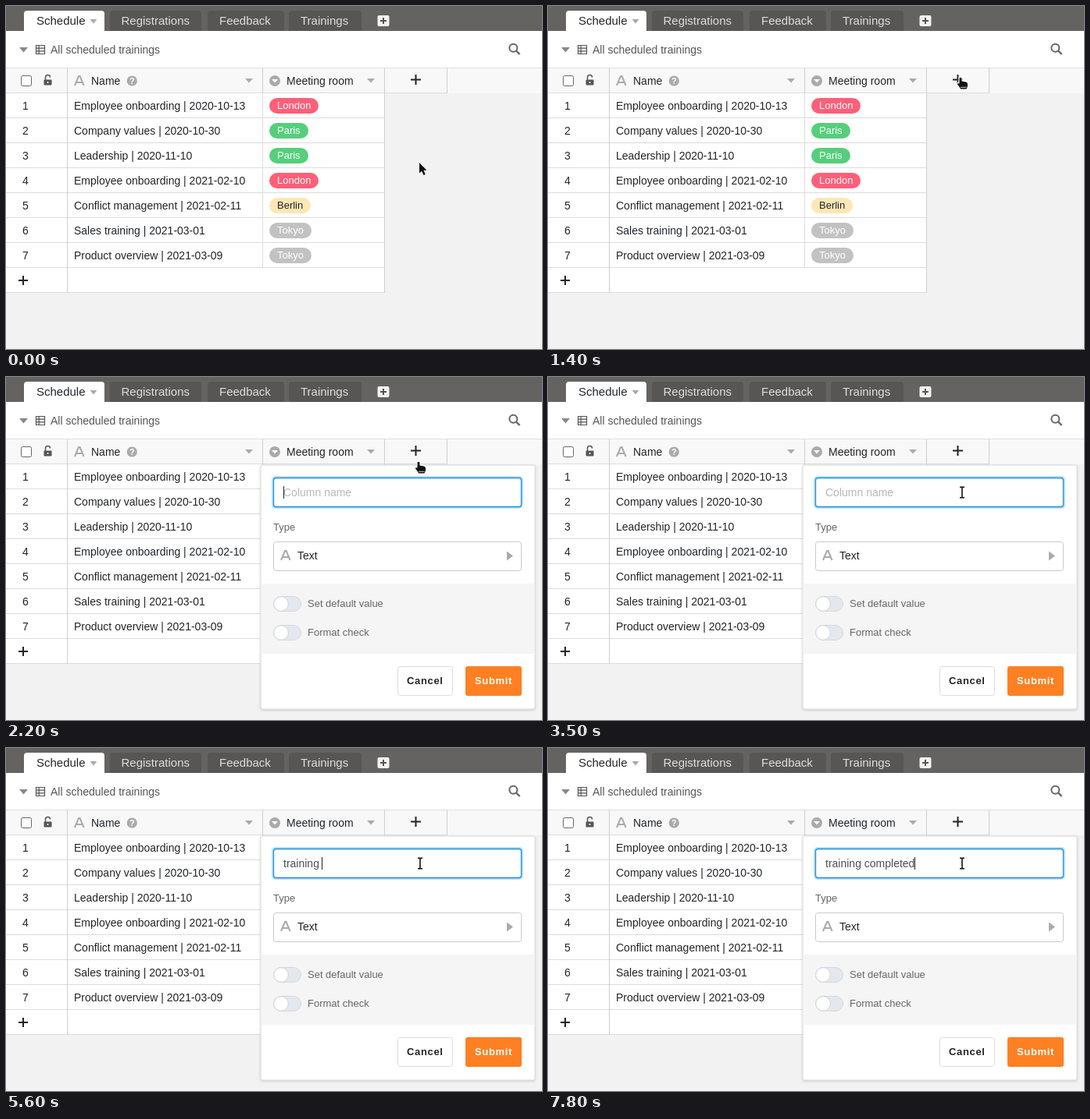
Animation, 686 px wide and 440 px high, one loop 8 s. Source, as an HTML page:

```html
<!DOCTYPE html>
<html lang="en">
<head>
<meta charset="utf-8">
<title>Adding a column</title>
<style>
  html, body { margin: 0; width: 100%; height: 100%; overflow: hidden; background: #f2f2f2; }
  svg { display: block; }
  text { font: 14px "Liberation Sans", Arial, sans-serif; white-space: pre; }
  .tab { font-size: 15px; }
  .small { font-size: 13px; }
  .button { font-size: 13px; font-weight: bold; letter-spacing: .65px; }
  .cursor path { stroke-linejoin: round; paint-order: stroke; }
</style>
</head>
<body>
<svg id="stage" width="686" height="440" viewBox="0 0 686 440"></svg>
<script>
const rect = (x, y, w, h, fill, r = 0, extra = '') =>
  `<rect x="${x}" y="${y}" width="${w}" height="${h}" rx="${r}" fill="${fill}" ${extra}/>`;
const box = (x, y, w, h, fill, stroke, r) =>
  rect(x + .5, y + .5, w - 1, h - 1, fill, r, `stroke="${stroke}"`);
const path = (d, fill, extra = '') => `<path d="${d}" fill="${fill}" ${extra}/>`;
const line = (d, stroke, width = 1) => path(d, 'none', `stroke="${stroke}" stroke-width="${width}"`);
const circle = (x, y, r, fill, extra = '') => `<circle cx="${x}" cy="${y}" r="${r}" fill="${fill}" ${extra}/>`;
const text = (x, y, s, fill = '#212529', cls = '', extra = '') =>
  `<text x="${x}" y="${y}" fill="${fill}" class="${cls}" ${extra}>${s}</text>`;
const down = (x, y, w, h, fill) => path(`M${x} ${y}h${w}l${-w / 2} ${h}z`, fill);
const plus = (x, y, r, color, width = 2) => line(`M${x - r} ${y}h${2 * r}M${x} ${y - r}v${2 * r}`, color, width);
const letterA = (x, y) => line(`M${x} ${y}l5 -12h1.6l5 12M${x + 2.2} ${y - 4}h7.2`, '#aaa', 2);

const rows = [
  ['Employee onboarding | 2020-10-13', 'London'],
  ['Company values | 2020-10-30', 'Paris'],
  ['Leadership | 2020-11-10', 'Paris'],
  ['Employee onboarding | 2021-02-10', 'London'],
  ['Conflict management | 2021-02-11', 'Berlin'],
  ['Sales training | 2021-03-01', 'Tokyo'],
  ['Product overview | 2021-03-09', 'Tokyo']
];
const rooms = { // pill width, fill, text colour
  London: [63, '#ff5f79', '#fff'],
  Paris: [50, '#55cf7b', '#fff'],
  Berlin: [53, '#ffe6b5', '#212529'],
  Tokyo: [54, '#c2c2c2', '#fff']
};

function topBars() {
  const tab = (x, w, label, tx, fill, color) =>
    path(`M${x} 32V10q0 -4 4 -4h${w - 8}q4 0 4 4V32z`, fill) + text(tx, 24, label, color, 'tab');
  return rect(0, 0, 686, 32, '#646362') +
    tab(23, 103, 'Schedule', 39, '#fff', '#212529') + down(107.5, 17, 9, 5.5, '#aaa') +
    tab(133, 117, 'Registrations', 147.5, '#575655', '#dedede') +
    tab(258, 98, 'Feedback', 273, '#575655', '#dedede') +
    tab(362, 93, 'Trainings', 377, '#575655', '#dedede') +
    rect(475.5, 12, 15, 14, '#f2f2f2', 2) + plus(483, 19, 4, '#555') +
    rect(0, 32, 686, 48, '#fff') +
    down(17, 53, 11, 6.5, '#888') +
    line('M38.5 50.5h11v11h-11zM38.5 54.2h11M38.5 57.8h11M42.2 50.5v11', '#555', 1.2) +
    text(57, 61, 'All scheduled trainings', '#555') +
    circle(649.3, 53.7, 5, 'none', 'stroke="#666" stroke-width="2"') + line('M653 57.5l4.5 4.5', '#666', 2.4);
}

function table() {
  const header = rect(0, 80, 686, 32, '#f8f8f8') + rect(485, 112, 201, 328, '#f2f2f2') +
    line('M0 79.5H686', '#dfdfdf') +
    box(19, 89, 14, 14, '#fff', '#666', 2) +
    rect(48.5, 94.5, 10, 7, '#555', 1) + line('M50.5 95V91.5a3 3 0 0 1 6 0', '#555', 1.5) +
    circle(53.5, 98, 1.1, '#f8f8f8') +
    letterA(88, 102) + text(109, 101, 'Name') +
    circle(161.3, 96, 6.6, '#aaa') +
    text(161.3, 99.8, '?', '#fff', '', 'text-anchor="middle" style="font-size:11px;font-weight:bold"') +
    down(306, 93, 10, 5.5, '#aaa') +
    circle(344, 96, 7, '#aaa') + down(340, 94, 8, 4.5, '#fff') +
    text(359, 101, 'Meeting room') + down(462, 93, 10, 5.5, '#aaa') +
    plus(524.5, 94.5, 6.5, '#212529');
  const body = rows.map(([name, room], i) => {
    const y = 112 + 32 * i, [w, fill, color] = rooms[room];
    return text(25, y + 21, i + 1, '#212529', '', 'text-anchor="middle"') + text(87, y + 21, name) +
      rect(337, y + 6, w, 20, fill, 10) + text(347, y + 20, room, color, 'small');
  }).join('');
  let rules = 'M0 111.5H565M328.5 112V335';
  for (let y = 143.5; y < 370; y += 32) rules += `M0 ${y}H485`;
  return header + rect(0, 112, 485, 256, '#fff') + body + plus(22, 352, 6, '#212529') +
    line(rules, '#dcdcdc') + line('M78.5 80V368M328.5 80V112M484.5 80V368M564.5 80V112', '#cfcfcf');
}

function panel() {
  const toggle = (y, label) => box(342, y, 36, 20, '#e4e8ee', '#d5d9df', 9.5) +
    circle(352, y + 10, 9.3, '#fff', 'stroke="#d0d4da"') + text(386, y + 14, label, '#666', 'small');
  return `<g id="panel">` +
    rect(326, 113, 351, 313, '#fff', 2, 'stroke="#d8d8d8" filter="url(#shadow)"') +
    rect(326.5, 265, 350, 90, '#f5f5f5') +
    `<g id="focus">${rect(341, 128, 320, 40, 'none', 4, 'stroke="#bfe0f7" stroke-width="2"')}</g>` +
    rect(342.5, 129.5, 317, 37, '#fff', 3, 'stroke="#1991de" stroke-width="1.3"') +
    text(355, 153, '', '', '', 'id="entry"') +
    rect(355, 140, 1, 16, '#222', 0, 'id="caret"') +
    text(342, 197, 'Type', '#666', 'small') +
    box(342, 211, 318, 38, '#fff', '#c9c9c9', 3) + letterA(352, 235) +
    text(373, 234, 'Text') + path('M641 223.5l8 6 -8 6z', '#aaa') +
    toggle(281, 'Set default value') + toggle(318, 'Format check') +
    box(501, 371, 71, 38, '#fff', '#dcdcdc', 3) + text(513, 394, 'Cancel', '#212529', 'button') +
    rect(588, 371, 72, 38, '#ff8023', 3) + text(600, 394, 'Submit', '#fff', 'button') + '</g>';
}

// Each pointer is drawn around its hot spot.
const pointers = {
  arrow: path('M0 0V13.5L3 10.8 5.5 16 7.8 15 5.5 9.8H9.5Z', '#111', 'stroke="#fff" stroke-width="1.6"'),
  hand: path('M-1.5 1.5Q0 0 1.5 1.5V5.5L7 6.5Q9 7 9 9V12L7.5 15.5H0L-1 13.5 -4 9.5Q-4 7 -1.5 8.5Z', '#111',
    'stroke="#fff" stroke-width="2.4"') + line('M0 13.3H7.5', '#fff', .8),
  beam: path('M-3 -7.5H3V-6H.8V6H3V7.5H-3V6H-.8V-6H-3Z', '#111', 'stroke="#fff" stroke-width="1.4"')
};

document.getElementById('stage').innerHTML =
  `<defs><filter id="shadow" x="-5%" y="-5%" width="110%" height="110%">
    <feDropShadow dx="0" dy="1" stdDeviation="1.6" flood-opacity=".18"/></filter></defs>` +
  topBars() + table() + panel() + '<g id="cursor" class="cursor"></g>';

const [panelEl, focusEl, entryEl, caretEl, cursorEl] =
  ['panel', 'focus', 'entry', 'caret', 'cursor'].map(id => document.getElementById(id));
const measure = document.createElement('canvas').getContext('2d');
measure.font = '14px "Liberation Sans", Arial, sans-serif';

// Times in tenths of a second at which each letter has been typed.
const phrase = 'training completed';
const keys = [37, 38, 42, 42, 46, 48, 51, 53, 56, 59, 61, 64, 67, 67, 72, 73, 76, 78];

function cursorAt(step) {
  if (step < 22) {
    const u = Math.min(1, Math.max(0, (step - 4) / 10));
    const y = 201 - 110 * u * u * (3 - 2 * u);
    return [529 - 1.5 * u + 3.5 * Math.sin(Math.PI * u), y, y < 112 ? 'hand' : 'arrow'];
  }
  const u = Math.min(1, (step - 21) / 6), ease = 1 - (1 - u) ** 2;
  const y = 91 + 57 * ease;
  return [527.5 + 2.5 * ease, y, y < 112 ? 'hand' : y < 128 ? 'arrow' : 'beam'];
}

function draw(step) {
  const opacity = Math.min(1, Math.max(0, (step - 16) * .42));
  panelEl.setAttribute('opacity', opacity);
  focusEl.setAttribute('opacity', step < 19 ? 0 : 1);

  const typed = phrase.slice(0, keys.filter(k => k <= step).length);
  entryEl.textContent = typed || 'Column name';
  entryEl.setAttribute('fill', typed ? '#495057' : '#b4b8bc');
  caretEl.setAttribute('x', Math.floor(355 + measure.measureText(typed).width));
  const caretHidden = step < 19 || (step >= 24 && step < 29) || step === 35 || step === 36 ||
    step === 67 || step === 68;
  caretEl.setAttribute('opacity', caretHidden ? 0 : 1);

  const [x, y, kind] = cursorAt(step);
  cursorEl.innerHTML = pointers[kind];
  cursorEl.setAttribute('transform', `translate(${Math.round(x)} ${Math.round(y)})`);
}

let shown = -1;
function tick() {
  const step = Math.floor(performance.now() % 8000 / 100);
  if (step !== shown) draw(shown = step);
  requestAnimationFrame(tick);
}
tick();
</script>
</body>
</html>
```
